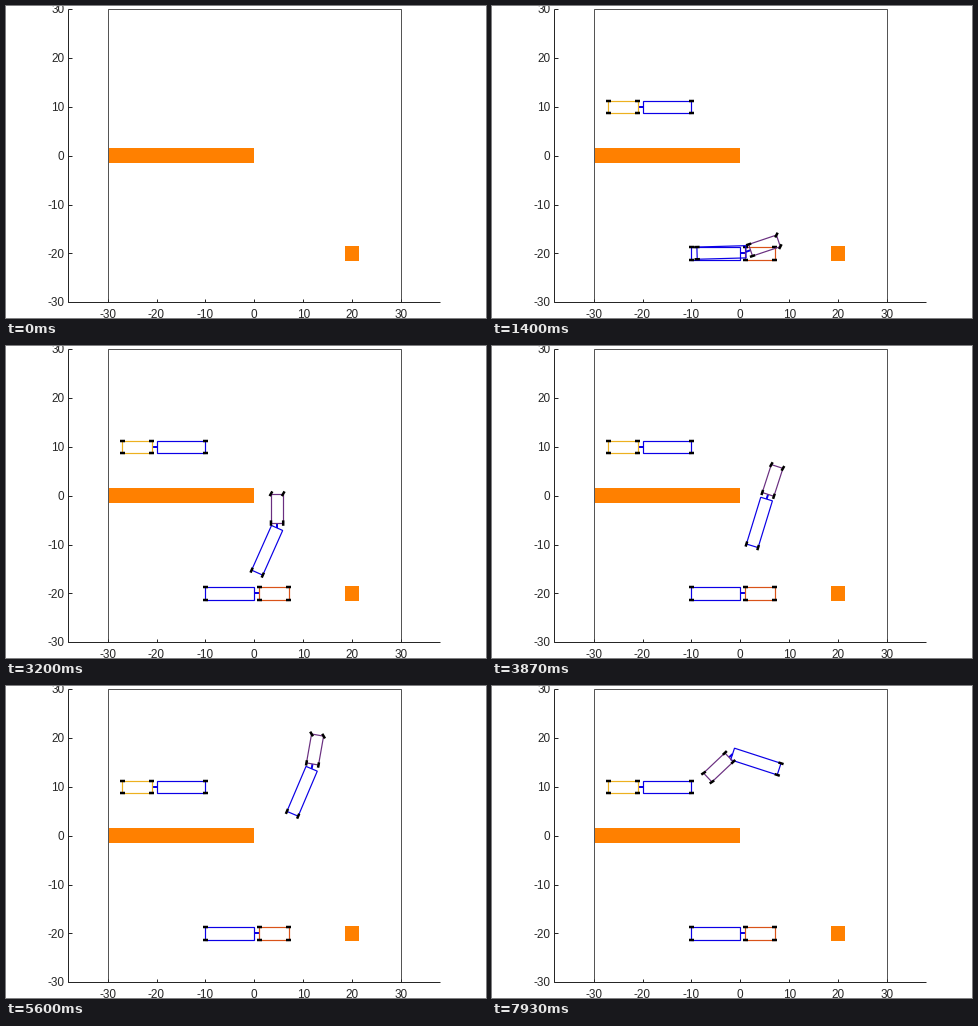
Recreate the animation shown at these times as a matplotlib script. Size 480 px wide and 312 px high, loop 8 s.

```python
import numpy as np
import matplotlib.pyplot as plt
from matplotlib.animation import FuncAnimation
from matplotlib.patches import Rectangle

W, H, DPI = 480, 312, 100
PX = 72 / DPI                      # points per pixel
SCALE, X0, Y0 = 4.89, 248.3, 149.6
TICKS = range(-30, 31, 10)
INK = "#262626"
BLUE = "#0b00e6"

TRACTOR, TRAILER, HITCH, WIDTH, WHEEL = 6, 10, 1, 2.5, 1.1
STEP, SUB = 0.6, 20                # distance per step, substeps per step
CUSP = 10                          # the truck reverses until this step

# step, rear axle x, y, heading in degrees
POSES = [
    (1, 1, -20, 0), (5, -1.34, -19.53, -21.5), (10, -4.13, -18.43, -21.5),
    (14, -1.9, -19.3, -21.5), (21, 2.1, -19.35, 18.6),
    (32, 6.12, -14.54, 81.6), (48, 4.66, -5.62, 90), (69, 8.24, 6.38, 64.7),
    (84, 11.9, 14.65, 80), (100, 7.03, 21.6, 172.5), (119, -2.3, 16, 223.4),
]
# step, trailer heading in degrees
TRAILER_POSES = [
    (1, 0), (21, 1.6), (48, 66), (69, 70), (84, 67), (100, 98.8), (119, 162),
]


def unit(a):
    return np.array([np.cos(a), np.sin(a)])


def normal(a):
    return np.array([-np.sin(a), np.cos(a)])


def to_px(p):
    p = np.asarray(p, float)
    return np.stack([X0 + SCALE * p[..., 0], Y0 - SCALE * p[..., 1]], -1)


def build_path():
    """Positions, headings and signed step lengths along the drive."""
    pos, head, ds = [], [], []
    for (f0, xa, ya, ha), (f1, xb, yb, hb) in zip(POSES, POSES[1:]):
        n = (f1 - f0) * SUB
        last = f1 == POSES[-1][0]
        s = (np.arange(n + int(last)) / n)[:, None]
        gear = -1 if f0 < CUSP else 1
        reach = gear * STEP * (f1 - f0)
        a, b = np.array([xa, ya]), np.array([xb, yb])
        ma, mb = (reach * unit(np.radians(h)) for h in (ha, hb))
        pos.append((2*s**3 - 3*s**2 + 1) * a + (s**3 - 2*s**2 + s) * ma
                   + (3*s**2 - 2*s**3) * b + (s**3 - s**2) * mb)
        d = gear * (6 * (s**2 - s) * (a - b) + (3*s**2 - 4*s + 1) * ma
                    + (3*s**2 - 2*s) * mb)
        head.append(np.arctan2(d[:, 1], d[:, 0]))
        ds.append(np.full(len(s), gear * STEP / SUB))
    return (np.concatenate(pos), np.unwrap(np.concatenate(head)),
            np.concatenate(ds))


def drag_trailer(head, curv, ds):
    """Trailer heading from the hitch motion, eased onto the known angles."""
    phi = np.zeros(len(head))
    for i in range(len(head) - 1):
        gap = head[i] - phi[i]
        rate = (np.sin(gap) - HITCH * curv[i] * np.cos(gap)) / TRAILER
        phi[i + 1] = phi[i] + ds[i] * rate
    at = [(step - 1) * SUB for step, _ in TRAILER_POSES]
    error = np.radians([deg for _, deg in TRAILER_POSES]) - phi[at]
    return phi + np.interp(np.arange(len(phi)), at, error)


pos, head, ds = build_path()
curv = np.gradient(head) / ds
steer = np.arctan(TRACTOR * curv)
phi = drag_trailer(head, curv, ds)

fig = plt.figure(figsize=(W / DPI, H / DPI), dpi=DPI, facecolor="white")
ax = fig.add_axes([0, 0, 1, 1])
ax.set(xlim=(0, W), ylim=(H, 0))
ax.axis("off")


def line(points, color, width):
    p = np.asarray(points, float)
    return ax.plot(p[:, 0], p[:, 1], color=color, lw=width * PX,
                   solid_capstyle="butt", solid_joinstyle="miter")[0]


def block(x, y, w, h):
    left, top = to_px((x, y + h))
    ax.add_patch(Rectangle((left, top), w * SCALE, h * SCALE,
                           facecolor="#ff8000", edgecolor="none"))


def draw_scene():
    block(-30, -1.5, 30, 3)
    block(18.5, -21.5, 3, 3)
    line(to_px([(-30, -30), (30, -30), (30, 30), (-30, 30), (-30, -30)]),
         "#555555", 1)
    left, base = to_px((-38, -30))
    right, top = to_px((38, 30))
    line([(left, top), (left, base), (right, base)], INK, 1)
    font = dict(family="Liberation Sans", size=11.7 * PX, color=INK,
                va="baseline")
    for v in TICKS:
        x, y = to_px((v, v))
        line([(x, base), (x, base - 3.5)], INK, 1)
        line([(left, y), (left + 3.5, y)], INK, 1)
        ax.text(x, 312, str(v), ha="center", **font)
        ax.text(58.2, y + 4.2, str(v), ha="right", **font)


def rect(back, a, length):
    side = normal(a) * WIDTH / 2
    front = back + length * unit(a)
    return np.array([back + side, front + side, front - side, back - side,
                     back + side])


def axle(centre, a, turn=0):
    """Two wheels, each followed by a gap."""
    half = unit(a + turn) * WHEEL / 2
    out = []
    for k in (1, -1):
        hub = centre + k * normal(a) * WIDTH / 2
        out += [hub - half, hub + half, (np.nan, np.nan)]
    return out


class Rig:
    def __init__(self, color):
        blank = [(np.nan, np.nan)]
        self.trailer = line(blank, BLUE, 1.2)
        self.hitch = line(blank, BLUE, 2)
        self.tractor = line(blank, color, 1.2)
        self.wheels = line(blank, "black", 2.5)
        self.parts = [self.trailer, self.hitch, self.tractor, self.wheels]

    def place(self, rear, a, b, turn=0):
        rear = np.asarray(rear, float)
        joint = rear - HITCH * unit(a)
        tail = joint - TRAILER * unit(b)
        wheels = (axle(rear, a) + axle(rear + TRACTOR * unit(a), a, turn)
                  + axle(tail, b))
        shapes = [rect(tail, b, TRAILER), [joint, rear],
                  rect(rear, a, TRACTOR), wheels]
        for part, pts in zip(self.parts, shapes):
            part.set_data(*to_px(pts).T)

    def show(self, on):
        for part in self.parts:
            part.set_visible(on)


draw_scene()
start, goal, truck = Rig("#d95319"), Rig("#edb120"), Rig("#6a2f80")
start.place((1, -20), 0, 0)
goal.place((-21, 10), np.pi, np.pi)
rigs = [start, goal, truck]


def update(i):
    step = int(0.3 * i + 0.25)     # 120 steps over 400 ticks
    for rig in rigs:
        rig.show(step > 0)
    if step > 0:
        k = (step - 1) * SUB
        truck.place(pos[k], head[k], phi[k], steer[k])
    return [part for rig in rigs for part in rig.parts]


anim = FuncAnimation(fig, update, frames=400, interval=20,
                     init_func=lambda: update(0), repeat=True,
                     repeat_delay=0, blit=False)
plt.show()
```
